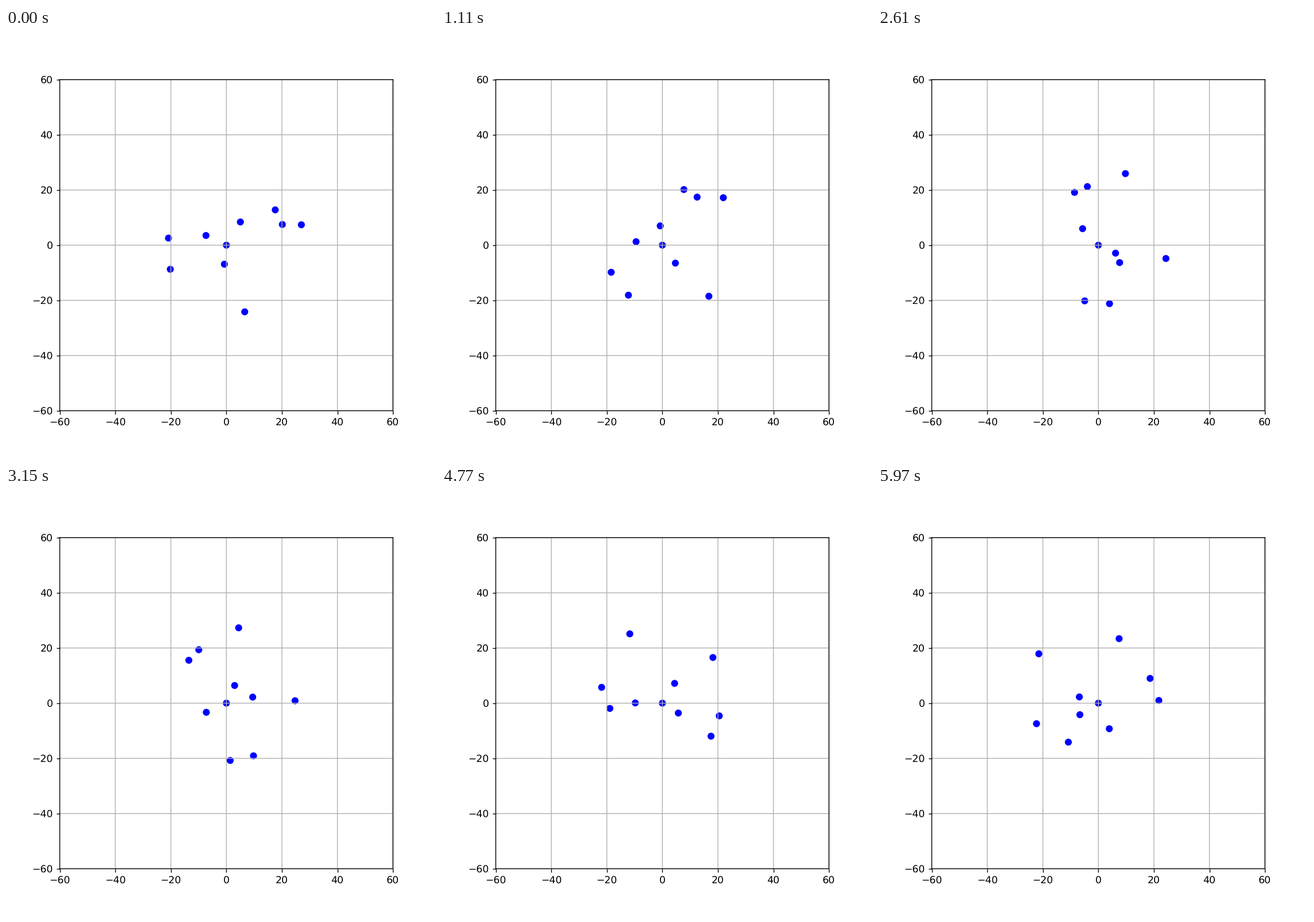
These frames come from a looping animation (748 px wide and 748 px high, 6 s). A matplotlib script:

```python
import numpy as np
import matplotlib.pyplot as plt
from matplotlib.animation import FuncAnimation

FRAMES, INTERVAL = 200, 30
DT = 0.05
SUN, PLANET = 1000, 1.6  # masses, with G = 1

# Starting radius and angle in degrees of each planet.
PLANETS = [(6.94, 264), (8.14, 154.5), (9.8, 59), (21.0, 173), (21.5, 20.4),
           (21.75, 36), (22.0, 203.4), (25.05, 285.3), (28.0, 15.3)]


def gravity(pos, mass):
    """Pull of all bodies on each other; the sun stays fixed."""
    gap = pos - pos[:, None]
    dist = np.abs(gap)
    np.fill_diagonal(dist, np.inf)
    pull = (mass * gap / dist**3).sum(axis=1)
    pull[0] = 0
    return pull


def simulate():
    """Semi-implicit Euler steps from circular orbits, as complex positions."""
    radius, angle = np.array(PLANETS).T
    heading = np.exp(1j * np.radians(angle))
    pos = np.append(0, radius * heading)
    vel = np.append(0, 1j * heading * np.sqrt(SUN / radius))
    mass = np.append(SUN, np.full(len(radius), PLANET))
    track = [pos]
    for _ in range(FRAMES - 1):
        vel = vel + gravity(pos, mass) * DT
        pos = pos + vel * DT
        track.append(pos)
    return np.array(track)


track = simulate()

plt.rcParams.update({"path.snap": False, "text.hinting": "no_hinting"})
fig, ax = plt.subplots(figsize=(6, 6), dpi=748 / 6)
ax.set_xlim(-60, 60)
ax.set_ylim(-60, 60)
ax.grid(True)
# One colour per dot keeps them from being rounded to whole pixels.
dots = ax.scatter(track[0].real, track[0].imag, color=["blue"] * track.shape[1])


def update(i):
    dots.set_offsets(np.column_stack([track[i].real, track[i].imag]))
    return dots,


anim = FuncAnimation(fig, update, frames=FRAMES, interval=INTERVAL,
                     repeat=True, repeat_delay=0)
plt.show()
```
